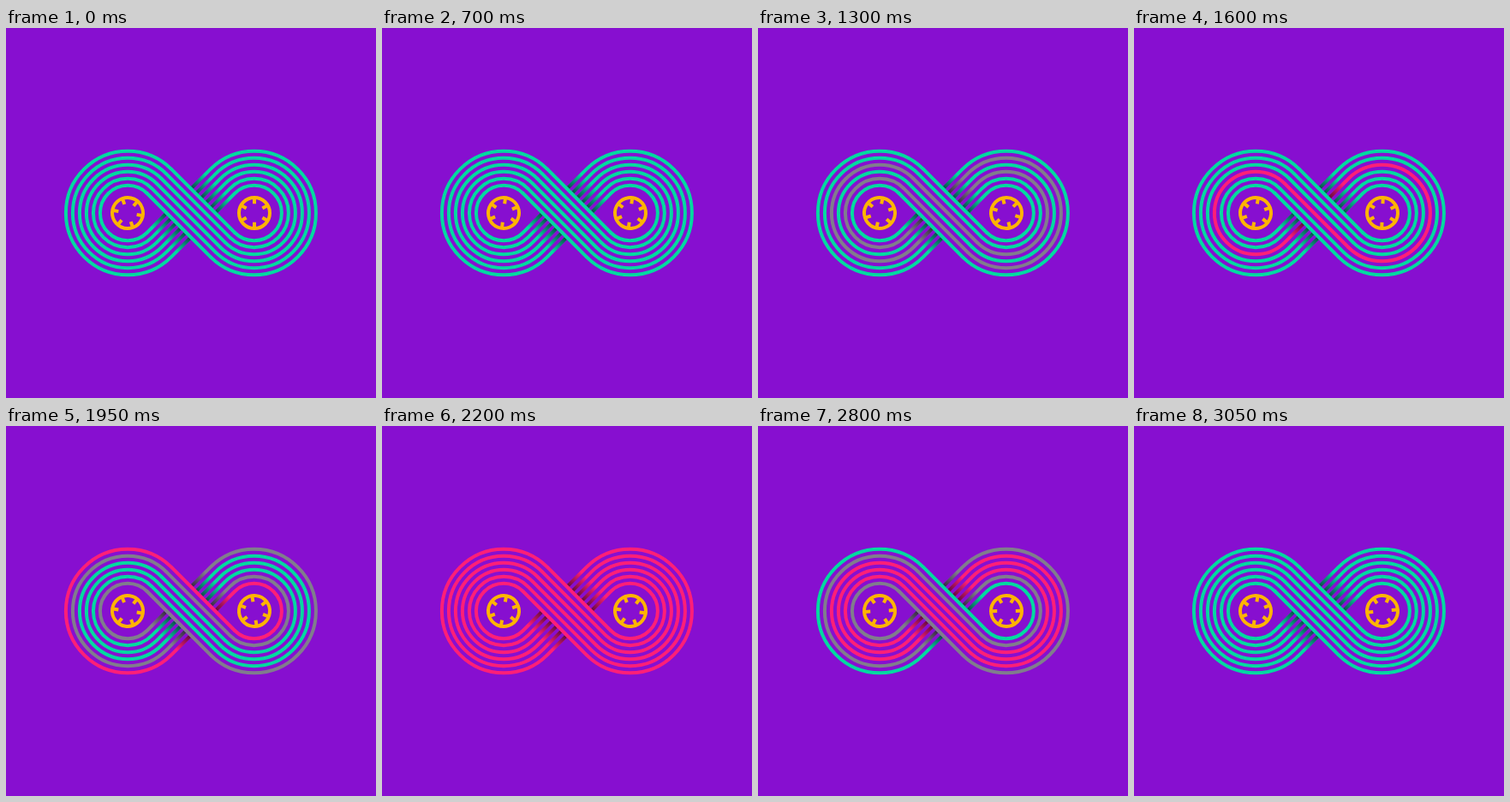
These frames come from a looping animation (432x432 px, 3.1 s). An HTML page with a canvas:

```html
<!DOCTYPE html>
<html lang="en">
<head>
<meta charset="utf-8">
<title>Endless tape</title>
<style>
  html, body { margin: 0; width: 100%; height: 100%; overflow: hidden; background: #870fd0; }
  canvas { display: block; width: 432px; height: 432px; }
</style>
</head>
<body>
<canvas id="stage" width="432" height="432"></canvas>
<script>
const ctx = document.getElementById('stage').getContext('2d');
const BG = '#870fd0', GOLD = '#ffb400';
const TEAL = [0, 218, 160], PINK = [255, 31, 119];
const STEP = 50, STEPS = 62;
const QUARTER = Math.PI / 4;
const MID_X = 215.9, MID_Y = 216, HALF = 73.8;
const LEFT_X = MID_X - HALF, RIGHT_X = MID_X + HALF;
const LINES = 6, GAP = 8, OUTER = 72.2, INNER = OUTER - GAP * (LINES - 1);
const BAND = 22, SHADE = 22;

const clamp = x => Math.max(0, Math.min(1, x));

// Reel angle in degrees: a whole number of teeth per loop, with a slow sway
function spin(start, teeth, n) {
  const u = n / STEPS;
  return start + 60 * teeth * u + 13 * Math.sin(2 * Math.PI * u);
}

// 0 is teal, 1 is pink; a flash runs inwards to line 3 before the full change
function pinkness(line, n) {
  const away = Math.abs(line - 3);
  const flashAt = Math.floor(32 - 5.5 * Math.min(away, 2));
  if (n === flashAt) return away ? 0.5 : 1;
  const on = clamp((n - 40 + away) / 2);
  const off = clamp((n - 57 + away) / 2);
  return on - off;
}

function lineColor(line, n) {
  const mix = pinkness(line, n);
  return `rgb(${TEAL.map((c, i) => Math.round(c + (PINK[i] - c) * mix))})`;
}

// r is the line's radius in the left loop, q in the right one
function eachLine(color, trace) {
  ctx.lineWidth = 4;
  for (let i = 0; i < LINES; i++) {
    ctx.strokeStyle = color(i);
    ctx.beginPath();
    trace(OUTER - GAP * i, INNER + GAP * i);
    ctx.stroke();
  }
}

// Darkens the lower lines beside the crossing, then clears the upper band
function shadow() {
  ctx.save();
  ctx.translate(MID_X, MID_Y);
  ctx.rotate(QUARTER);
  for (const side of [-1, 1]) {
    const fade = ctx.createLinearGradient(0, side * BAND, 0, side * (BAND + SHADE));
    fade.addColorStop(0, 'rgba(20,0,35,.65)');
    fade.addColorStop(1, 'rgba(20,0,35,0)');
    eachLine(() => fade, (r, q) => {
      const x = (q - r) / 2;
      ctx.moveTo(x, side * (BAND - 2));
      ctx.lineTo(x, side * (BAND + SHADE));
    });
  }
  ctx.fillStyle = BG;
  ctx.fillRect(-BAND - 1, -BAND, 2 * BAND + 2, 2 * BAND);
  ctx.restore();
}

function reel(x, degrees) {
  ctx.save();
  ctx.translate(x, 216);
  ctx.rotate(degrees * Math.PI / 180);
  ctx.strokeStyle = GOLD;
  ctx.lineWidth = 4;
  ctx.beginPath();
  ctx.arc(0, 0, 18, 0, 2 * Math.PI);
  ctx.stroke();
  ctx.beginPath();
  for (let i = 0; i < 6; i++) {
    ctx.moveTo(0, -17);
    ctx.lineTo(0, -10.8);
    ctx.rotate(Math.PI / 3);
  }
  ctx.stroke();
  ctx.restore();
}

function draw(now) {
  const n = Math.floor(now / STEP) % STEPS;
  const color = line => lineColor(line, n);
  ctx.fillStyle = BG;
  ctx.fillRect(0, 0, 432, 432);

  eachLine(color, (r, q) => {
    ctx.arc(RIGHT_X, MID_Y, q, 3 * QUARTER, -3 * QUARTER, true);
    ctx.arc(LEFT_X, MID_Y, r, QUARTER, 7 * QUARTER);
  });
  shadow();
  ctx.lineCap = 'round';
  eachLine(color, (r, q) => {
    const a = r * Math.SQRT1_2, b = q * Math.SQRT1_2;
    ctx.moveTo(LEFT_X + a, MID_Y - a);
    ctx.lineTo(RIGHT_X - b, MID_Y + b);
  });
  ctx.lineCap = 'butt';

  reel(142, spin(-20, 32, n));
  reel(290, spin(0, 35, n));
}

function tick() {
  draw(performance.now());
  requestAnimationFrame(tick);
}
tick();
</script>
</body>
</html>
```
